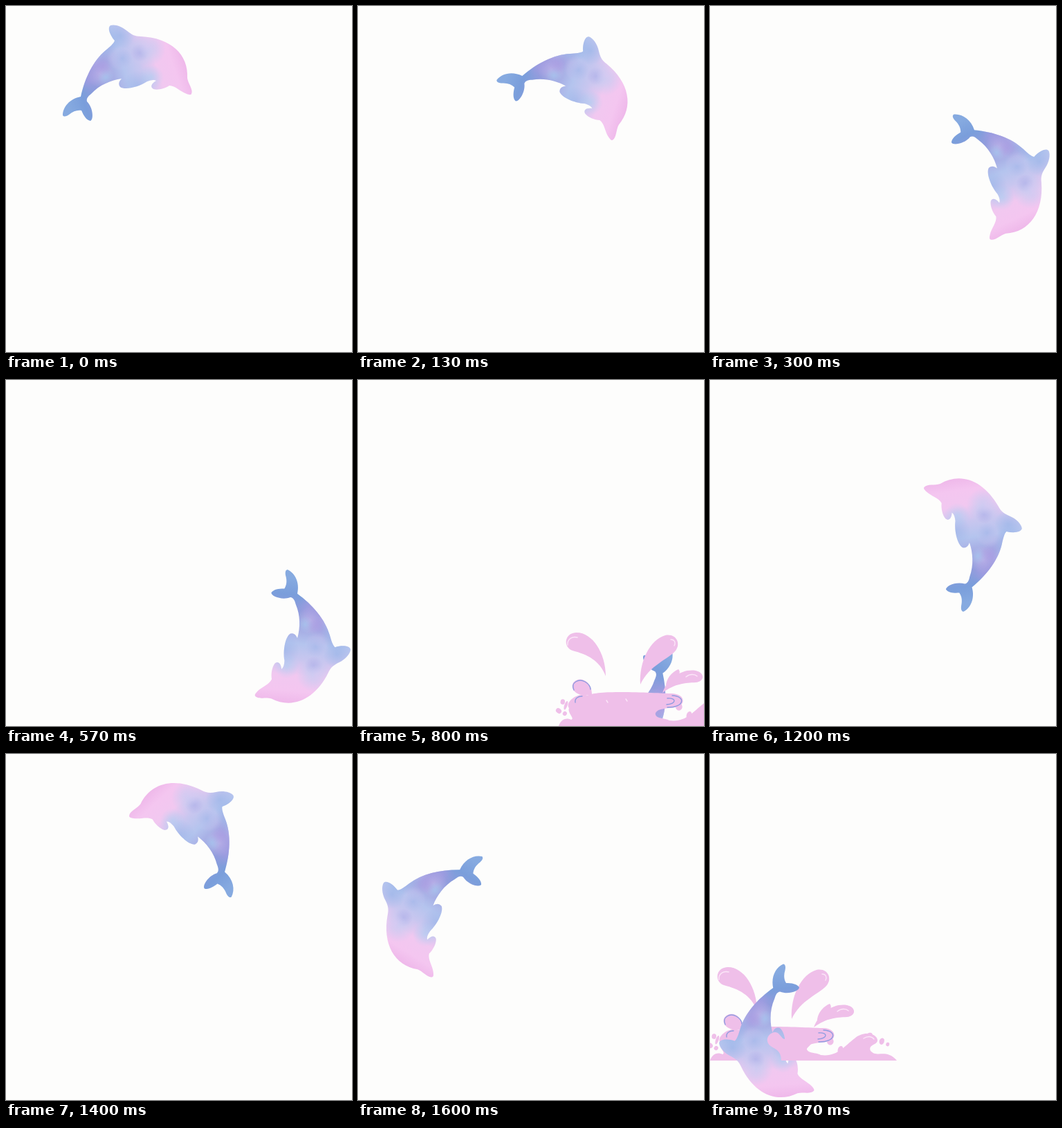
An HTML page with a canvas for the animation above (1910 ms loop, 500 by 500 pixels).

```html
<!DOCTYPE html>
<html lang="en">
<head>
<meta charset="utf-8">
<title>Leaping dolphin</title>
<style>
  html, body { margin: 0; width: 100%; height: 100%; overflow: hidden; background: #fdfdfc; }
  canvas { display: block; width: 500px; height: 500px; }
</style>
</head>
<body>
<canvas id="stage" width="500" height="500"></canvas>
<script>
const ctx = document.getElementById('stage').getContext('2d');
const LOOP = 1910, STEP = 100 / 3, LAST = 56, TURNAROUND = 33;
const PAPER = '#fdfdfc', WATER = '#efbfe9', SHINE = '#fbe6f8', RING = '#8f9ce0';
const WASH = ['#edb4e8', '#f4c6f0', '#f1c8f0', '#c8c6ef', '#b4c4ee', '#a3a8e2', '#8f9cdc', '#7a9edb', '#86aae0'];
const BLOTS = ['159,208,242', '169,155,226', '222,200,242', '143,176,230'];
const WATERLINE = { x: 135, y: 443 };

const body = new Path2D(`M268 127 C271 121 263 112 262 104 C264 70 238 46 195 44
  C186 44 181 41 175 36 C167 29 157 26 151 28 C146 31 150 42 157 50
  C156 54 150 59 144 64 C126 79 114 104 108 131 C92 134 82 146 82 158
  C84 161 88 159 91 157 C97 152 103 150 109 151 C112 158 116 165 122 166
  C127 164 126 147 117 138 C116 134 118 131 123 127 C135 114 152 107 167 105
  C163 109 162 113 165 117 C172 122 192 117 204 109 C209 107 214 106 217 108
  C210 112 208 117 213 120 C220 122 230 119 236 115 C245 115 252 124 261 127
  C264 128 267 129 268 127Z`);

const plumes = new Path2D(`M68 371 C68 337 48 307 25 308 C8 309 6 329 20 334 C42 340 59 348 68 371Z
  M118 383 C116 350 132 318 154 312 C170 309 177 324 169 334 C158 347 131 355 118 383Z`);
const jets = new Path2D(`M150 395 C158 374 178 360 198 363 C212 366 211 379 198 380
  C183 381 169 381 150 395Z M155 388 C154 376 163 365 173 361 C179 367 169 379 155 388Z
  M48 400 C49 385 40 374 28 376 C17 379 17 391 27 396 C34 400 42 397 48 400Z`);
const pool = new Path2D(`M0 443 C4 432 12 431 18 434 C24 432 12 424 15 417 C8 409 28 393 42 399
  C58 390 142 396 164 396 C184 397 184 414 168 416 C156 418 144 417 140 424
  C138 433 154 431 160 435 C184 438 193 423 209 411 C222 399 241 404 242 413
  C243 421 228 419 232 429 C242 440 254 425 270 443Z`);
const lump = new Path2D(`M103 443 C103 430 96 427 89 423 C78 416 83 403 94 402 C101 402 103 412 108 412
  C108 403 110 398 116 396 L150 396 C160 410 144 420 140 426 L140 443Z`);
const rings = new Path2D(`M22 391 C17 380 29 374 38 379 C43 382 46 386 46 390
  M24 409 C23 403 28 400 34 400 M164 399 C185 400 181 417 157 416 M157 403 C171 402 170 411 156 412`);
const glints = new Path2D(`M13 326 C12 317 20 313 27 315 M162 318 C168 318 169 323 167 327
  M222 411 C228 407 234 408 237 412 M184 372 C190 367 197 368 200 371 M69 406 l2 3 M97 404 l2 3`);

// Key poses: time, x, y, turn in degrees
const rightLeap = [
  [0, 185, 85, 0], [300, 437, 250, 83], [500, 430, 366, 102],
  [800, 390, 498, 155], [1000, 347, 413, 238], [1067, 270, 340, 275]
];
const leftLeap = [
  [1100, 400, 363, -80], [1300, 325, 68, -46], [1400, 271, 93, -29],
  [1600, 85, 232, 77], [1867, 79, 427, 113]
];

function seeded(seed) {
  return () => (seed = seed * 16807 % 2147483647) / 2147483647;
}

const rad = degrees => degrees * Math.PI / 180;

// Between two poses the dolphin swings about the centre that carries one into the other.
function pose(keys, time, flip) {
  let i = 0;
  while (i < keys.length - 2 && time >= keys[i + 1][0]) i++;
  const [t0, x0, y0, turn0] = keys[i], [t1, x1, y1, turn1] = keys[i + 1];
  const u = (time - t0) / (t1 - t0), swing = flip * rad(turn1 - turn0);
  const k = .5 / Math.tan(swing / 2);
  const cx = (x0 + x1) / 2 - (y1 - y0) * k, cy = (y0 + y1) / 2 + (x1 - x0) * k;
  const cos = Math.cos(swing * u), sin = Math.sin(swing * u);
  return {
    x: cx + (x0 - cx) * cos - (y0 - cy) * sin,
    y: cy + (x0 - cx) * sin + (y0 - cy) * cos,
    turn: rad(turn0 + (turn1 - turn0) * u)
  };
}

function dolphin(keys, time, flip) {
  const { x, y, turn } = pose(keys, time, flip);
  ctx.save();
  ctx.translate(x, y);
  ctx.scale(flip, 1);
  ctx.rotate(turn);
  ctx.translate(-185, -85);
  ctx.clip(body);
  const wash = ctx.createLinearGradient(268, 92, 92, 150);
  WASH.forEach((color, i) => wash.addColorStop(i / (WASH.length - 1), color));
  ctx.fillStyle = wash;
  ctx.fillRect(60, 10, 230, 180);
  const random = seeded(11);
  for (let i = 0; i < 18; i++) {
    const px = 115 + random() * 95, py = 35 + random() * 85, r = 12 + random() * 14;
    const rgb = BLOTS[i % BLOTS.length];
    const blot = ctx.createRadialGradient(px, py, 0, px, py, r);
    blot.addColorStop(0, `rgba(${rgb},.5)`);
    blot.addColorStop(1, `rgba(${rgb},0)`);
    ctx.fillStyle = blot;
    ctx.fillRect(px - r, py - r, r * 2, r * 2);
  }
  ctx.restore();
}

function fill(path) {
  ctx.fillStyle = WATER;
  ctx.fill(path);
}

function line(path, color) {
  ctx.strokeStyle = color;
  ctx.lineWidth = 1.4;
  ctx.lineCap = 'round';
  ctx.stroke(path);
}

function beads() {
  const random = seeded(5);
  for (let i = 0; i < 12; i++) {
    const x = i % 3 ? 165 + random() * 100 : random() * 16;
    const spray = new Path2D();
    spray.ellipse(x, 404 + random() * 26, 2 + random() * 3, 2 + random() * 5, random(), 0, Math.PI * 2);
    fill(spray);
  }
}

function water() {
  [plumes, jets, pool].forEach(fill);
  beads();
  line(rings, RING);
  line(glints, SHINE);
}

function splash(dx, dy, size, paint) {
  if (size <= 0) return;
  const { x, y } = WATERLINE;
  ctx.save();
  ctx.translate(dx + x, dy + y);
  ctx.scale(.55 + .45 * size, size);
  ctx.translate(-x, -y);
  paint();
  ctx.restore();
}

// In the slow stretches only every third step shows a new picture.
function stepAt(time) {
  const i = Math.min(LAST, Math.floor((time + 3.4) / STEP));
  const slow = (i >= 9 && i < 17) || (i >= 24 && i < 27);
  return slow ? i - i % 3 : i;
}

function draw(time) {
  const step = stepAt(time), now = step * STEP;
  ctx.fillStyle = PAPER;
  ctx.fillRect(0, 0, 500, 500);
  if (step < TURNAROUND) {
    dolphin(rightLeap, now, 1);
    splash(290, 57, 1 - Math.abs(step - 24) / 5, water);
  } else {
    const size = (step - 52) / 4;
    splash(0, 0, size, water);
    dolphin(leftLeap, now, -1);
    splash(0, 0, size, () => fill(lump));
  }
}

const start = performance.now();
function tick() {
  draw((performance.now() - start) % LOOP);
  requestAnimationFrame(tick);
}
tick();
</script>
</body>
</html>
```
